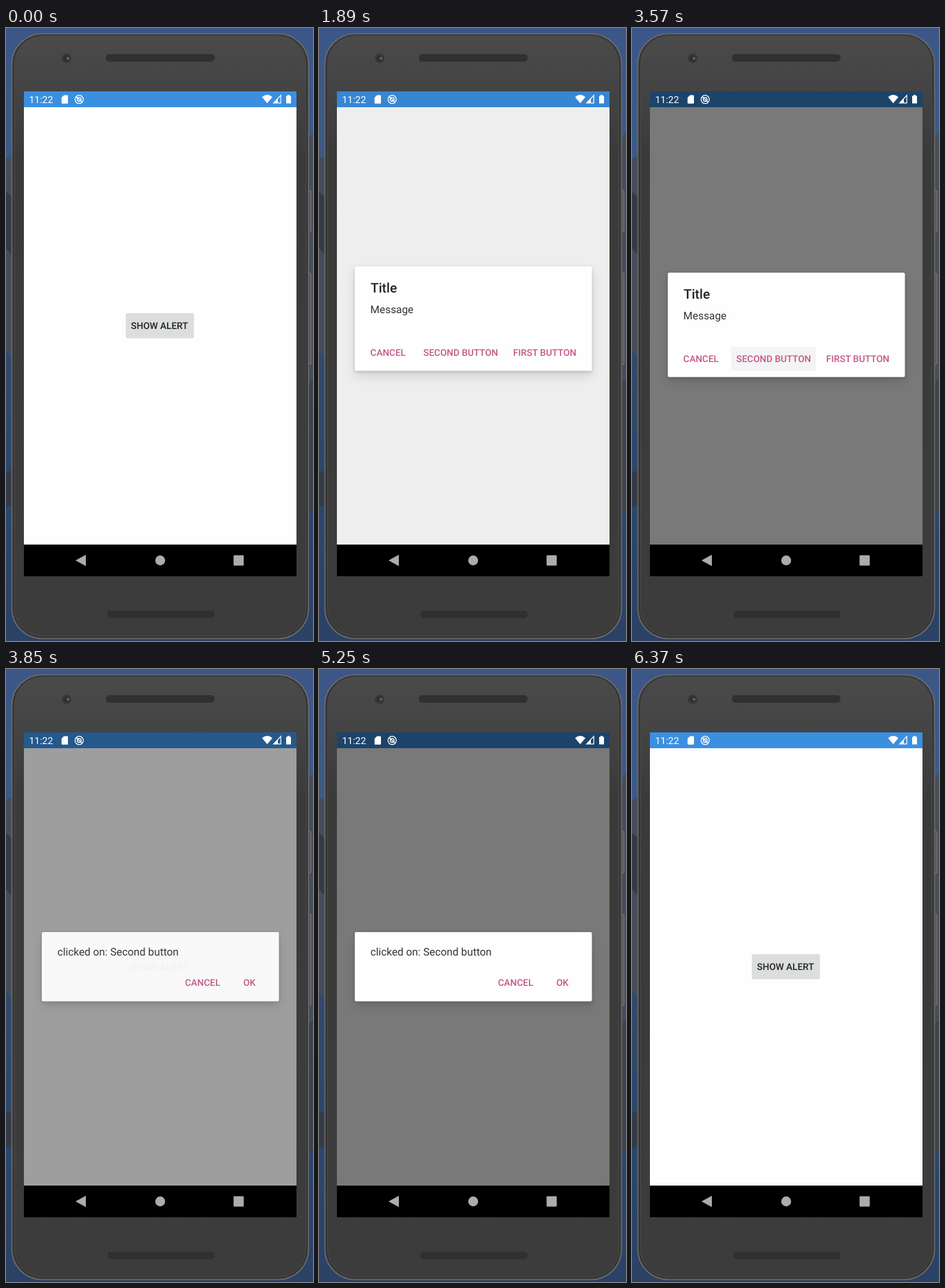
An HTML page for the animation above (7070 ms loop, 446 px wide and 890 px high).

```html
<!DOCTYPE html>
<html lang="en">
<head>
<meta charset="utf-8">
<title>Alert demo</title>
<style>
  html, body { margin: 0; width: 100%; height: 100%; overflow: hidden; background: #2c466e; }
  svg { display: block; width: 446px; height: 890px; }
  text { font-family: Roboto, sans-serif; text-rendering: geometricPrecision; white-space: pre; }
  .label { font-size: 13.55px; font-weight: 500; }
  .accent { fill: #c45888; }
  .body { font-size: 15.4px; fill: #333; }
  .title { font-size: 19.26px; font-weight: 500; fill: #222; }
</style>
</head>
<body>
<svg viewBox="0 0 446 890">
  <defs>
    <linearGradient id="sky" x2="0" y2="1">
      <stop offset="0" stop-color="#3c5787"/>
      <stop offset=".2" stop-color="#3b5a88"/>
      <stop offset=".55" stop-color="#30496c"/>
      <stop offset=".8" stop-color="#2b466c"/>
      <stop offset="1" stop-color="#2a4265"/>
    </linearGradient>
    <linearGradient id="shell" x2="0" y2="1">
      <stop offset="0" stop-color="#4a4a4a"/>
      <stop offset=".1" stop-color="#434343"/>
      <stop offset=".2" stop-color="#3a3a3a"/>
      <stop offset="1" stop-color="#3c3c3c"/>
    </linearGradient>
    <pattern id="mesh" width="4" height="4" patternUnits="userSpaceOnUse">
      <rect width="4" height="4" fill="#363636"/>
      <circle cx="1" cy="1" r=".8" fill="#1b1b1b"/>
      <circle cx="3" cy="3" r=".8" fill="#1b1b1b"/>
    </pattern>
    <filter id="near" x="-20%" y="-40%" width="140%" height="180%"><feGaussianBlur stdDeviation="2.5"/></filter>
    <filter id="far" x="-20%" y="-50%" width="140%" height="200%"><feGaussianBlur stdDeviation="9"/></filter>
    <clipPath id="screen"><rect x="26" y="92" width="396" height="658"/></clipPath>
  </defs>

  <!-- mountain lake behind the phone -->
  <rect width="446" height="890" fill="url(#sky)"/>
  <path d="M0 190L14 182V480L0 470Z" fill="#454c5a"/>
  <path d="M0 238L14 250V335L0 320Z" fill="#343a46"/>
  <path d="M0 645L14 640V690L0 696Z" fill="#343b47"/>
  <path d="M434 170L446 150V610L434 640Z" fill="#474d59"/>
  <path d="M434 520L446 510V705L434 690Z" fill="#3d424c"/>

  <!-- phone -->
  <g fill="#555" stroke="#8c8c8c" stroke-width=".8">
    <rect x="438" y="236" width="5" height="60" rx="1"/>
    <rect x="438" y="356" width="5" height="132" rx="1"/>
  </g>
  <rect x="8.5" y="8.5" width="431" height="878" rx="44" fill="#363636" stroke="#6c6c6c" stroke-width="1.6"/>
  <rect x="12.5" y="11.5" width="423" height="871" rx="40" fill="url(#shell)" stroke="#4a4a4a"/>
  <circle cx="88" cy="44" r="7" fill="#393939"/>
  <circle cx="88" cy="44" r="4.5" fill="#303030"/>
  <circle cx="90" cy="44" r="2" fill="#666"/>
  <rect x="145" y="38" width="158" height="11" rx="5" fill="url(#mesh)"/>
  <rect x="147" y="846" width="156" height="11" rx="5" fill="url(#mesh)"/>

  <!-- app -->
  <rect x="26" y="92" width="396" height="704" fill="#000"/>
  <rect x="26" y="115" width="396" height="635" fill="#fefefe"/>
  <rect x="26" y="92" width="396" height="23" fill="#3b8fe1"/>
  <rect id="lift" x="174" y="416" width="99" height="37" rx="2" filter="url(#near)" opacity="0"/>
  <rect x="174" y="414" width="99" height="36.5" rx="2" fill="#dcdedd"/>
  <rect id="press" x="174" y="414" width="99" height="36.5" rx="2" opacity="0"/>
  <text x="181.6" y="437.3" class="label" fill="#222">SHOW ALERT</text>
  <rect id="dim" x="26" y="92" width="396" height="658" opacity="0"/>

  <!-- status bar icons -->
  <g fill="#fff">
    <text x="33.4" y="108.8" font-size="14">11:22</text>
    <path d="M84.3 97.5H89Q90 97.5 90 98.5V108.7Q90 109.7 89 109.7H81.7Q80.7 109.7 80.7 108.7V101Z"/>
    <g fill="none" stroke="#fff" stroke-width="1.3">
      <circle cx="106.3" cy="103.7" r="6"/>
      <circle cx="106.3" cy="103.7" r="2.8"/>
      <path d="M102.3 100L110.5 107.6"/>
    </g>
    <path d="M372 100.2Q379.5 94 387 100.2L379.5 109.3Z"/>
    <path d="M399.2 97.8V108.8H388.8Z" fill="none" stroke="#fff" stroke-width="1.2"/>
    <path d="M395 102.2V109H388.5Z"/>
    <path d="M409 97H412V98.4H414V109.6H407V98.4H409Z"/>
  </g>

  <!-- navigation bar -->
  <g fill="#acacac">
    <path d="M101 773L116 764.8V781.2Z"/>
    <circle cx="224" cy="773" r="7.2"/>
    <rect x="330.6" y="765.6" width="14.8" height="14.8" rx="1"/>
  </g>

  <g id="dialogs" clip-path="url(#screen)"></g>
</svg>

<script>
const LOOP = 7070, TICK = 70;
const $ = id => document.getElementById(id);

const label = (x, y, text) => `<text x="${x}" y="${y}" class="label accent">${text}</text>`;

function dialog(id, top, height, ripple, content) {
  const box = `x="52" width="344.5" height="${height}" rx="2"`;
  return `<g id="${id}" opacity="0">
    <rect ${box} y="${top + 8}" filter="url(#far)" opacity=".1"/>
    <rect ${box} y="${top + 2}" filter="url(#near)" opacity=".15"/>
    <rect ${box} y="${top}" fill="#fefefe"/>
    <rect id="${id}Press" x="${ripple.x}" y="${ripple.y}" width="${ripple.w}" height="35" rx="2" opacity="0"/>
    ${content}</g>`;
}

$('dialogs').innerHTML =
  dialog('choice', 355.3, 151.5, { x: 144, y: 463, w: 123 },
    `<text x="75" y="393" class="title">Title</text>
     <text x="74.6" y="423" class="body">Message</text>` +
    label(74.6, 484.8, 'CANCEL') + label(151.5, 484.8, 'SECOND BUTTON') + label(282, 484.8, 'FIRST BUTTON')) +
  dialog('result', 382, 100.5, { x: 323, y: 438, w: 62 },
    `<text x="74.7" y="416" class="body">clicked on: Second button</text>` +
    label(260, 460.2, 'CANCEL') + label(344.7, 460.2, 'OK'));

// [time in ms, value] pairs, linear between neighbours
const tracks = {
  press: [[280, 0], [490, .1], [700, .1], [1050, 0]],
  dim: [[1750, 0], [1820, .01], [1890, .063], [2030, .5], [2100, .522], [3640, .522], [3710, .45],
        [3780, .35], [3850, .38], [3990, .522], [5670, .522], [5740, .45], [5810, .325],
        [5880, .17], [5950, .07], [6090, 0]],
  choice: [[1750, 0], [1820, .5], [1890, 1], [3640, 1], [3710, .78], [3780, .38], [3850, 0]],
  slide: [[1820, -10], [1890, -9], [1960, -3], [2030, 0]],
  choicePress: [[3500, 0], [3640, .08], [3780, 0]],
  result: [[3710, 0], [3780, .45], [3850, .95], [3920, 1], [5670, 1], [5740, .76], [5810, .38],
           [5880, .1], [5950, 0]],
  resultPress: [[5530, 0], [5670, .08], [5810, 0]]
};

function valueAt(keys, t) {
  const i = keys.findIndex(([time]) => time > t);
  if (i === 0) return keys[0][1];
  if (i < 0) return keys[keys.length - 1][1];
  const [t0, a] = keys[i - 1], [t1, b] = keys[i];
  return a + (b - a) * (t - t0) / (t1 - t0);
}

const start = performance.now();

function draw(now) {
  const elapsed = Math.max(0, now - start) % LOOP;
  const t = Math.floor(elapsed / TICK) * TICK;
  for (const id of ['press', 'dim', 'choice', 'choicePress', 'result', 'resultPress'])
    $(id).setAttribute('opacity', valueAt(tracks[id], t));
  $('lift').setAttribute('opacity', valueAt(tracks.press, t) * 3);
  $('choice').setAttribute('transform', `translate(0 ${valueAt(tracks.slide, t)})`);
  requestAnimationFrame(draw);
}
draw(start);
</script>
</body>
</html>
```
